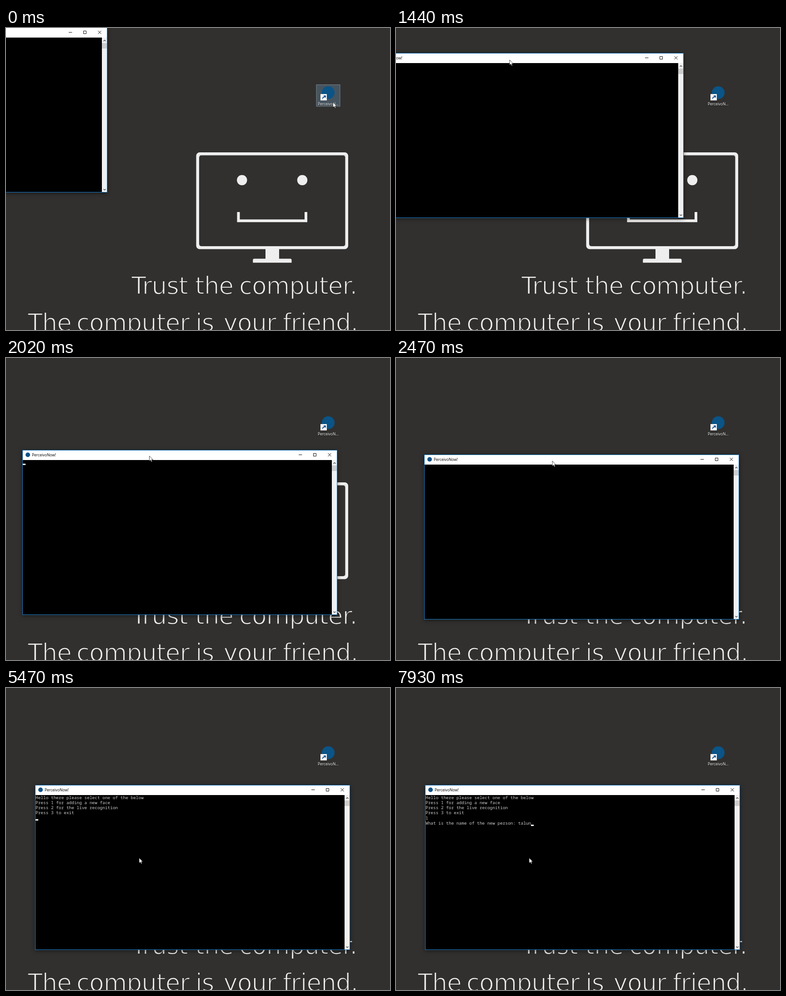
An HTML page for the animation above (8000 ms loop, 845x663 px).

```html
<!DOCTYPE html>
<html lang="en">
<head>
<meta charset="utf-8">
<title>Desktop console</title>
<style>
  html, body { margin: 0; width: 100%; height: 100%; overflow: hidden; background: #31302f; }
  svg { display: block; width: 100vw; height: 100vh; }
  text { white-space: pre; }
  /* The outline in the wall colour thins the letters. */
  .slogan { font: 400 53px "DejaVu Sans", sans-serif; letter-spacing: -.9px; fill: #f1f0ef; stroke: #31302f; stroke-width: 1.9px; }
  .ui { font: 8.4px "Open Sans", "Noto Sans", sans-serif; }
  .label { fill: #fff; text-anchor: middle; text-shadow: 0 1px 1px #000; }
  .console { font: 9.444px "Noto Sans Mono", "DejaVu Sans Mono", monospace; fill: #ccc; }
  #win { filter: drop-shadow(0 2px 5px rgba(0, 0, 0, .5)); }
</style>
</head>
<body>
<svg viewBox="0 0 845 663">
  <rect width="845" height="663" fill="#31302f"/>

  <g fill="#efeeee">
    <rect x="421.75" y="276.25" width="328" height="206" rx="4.5" fill="none" stroke="#efeeee" stroke-width="6.5"/>
    <path d="M425 285V279.5H430.5Q425 279.5 425 285ZM746.5 285V279.5H741Q746.5 279.5 746.5 285ZM425 473.5V479H430.5Q425 479 425 473.5ZM746.5 473.5V479H741Q746.5 479 746.5 473.5Z"/>
    <circle cx="519.3" cy="334" r="11.2"/>
    <circle cx="652" cy="334" r="11.2"/>
    <path d="M511.5 404V423.3H660V404" fill="none" stroke="#efeeee" stroke-width="6"/>
    <path d="M571 485H601V506.5H625.5Q628.5 506.5 628.5 509.5V515.3H543.3V509.5Q543.3 506.5 546.3 506.5H571Z"/>
  </g>
  <g class="slogan">
    <text y="584"><tspan x="276">Trust</tspan><tspan x="416">the</tspan><tspan x="513">computer.</tspan></text>
    <text y="665"><tspan x="48">The</tspan><tspan x="155">computer</tspan><tspan x="417">is</tspan><tspan x="478.5">your</tspan><tspan x="609">friend.</tspan></text>
  </g>

  <rect id="selection" x="683" y="124.5" width="52" height="47.5" fill="#46545f" stroke="#77838b"/>
  <circle cx="709" cy="142" r="14" fill="#0a5487"/>
  <rect x="692" y="145" width="14" height="14" fill="#f4f6f8"/>
  <path d="M696 157Q695 151 700 150.5L698.5 148H704V153.5L702 152Q698 152.500 696 157Z" fill="#2c5a94"/>
  <text class="ui label" x="709" y="169.500">PerceivoN...</text>

  <g id="win">
    <rect width="693" height="362" fill="#1a7fd0"/>
    <rect x="1" y="1" width="691" height="21" fill="#fff"/>
    <rect x="1" y="22" width="680" height="339" fill="#000"/>
    <rect x="681" y="22" width="11" height="339" fill="#f0f0f0"/>
    <rect x="681" y="34" width="11" height="12" fill="#cdcdcd"/>
    <path d="M684.500 30L687 27.500L689.500 30M684.500 354.500L687 357L689.500 354.500" fill="none" stroke="#444" stroke-width="1.2"/>
    <circle cx="12" cy="10.500" r="5" fill="#0f5288"/>
    <text class="ui" x="21" y="13.700" fill="#000">PerceivoNow!</text>
    <path d="M608 10.500H615.500M640.500 7.500H646.500V13.500H640.500ZM672.500 7L679.500 14M679.500 7L672.500 14" fill="none" stroke="#111"/>
    <g class="console" id="lines"></g>
    <rect id="caret" width="6" height="3" fill="#fff"/>
  </g>

  <path id="pointer" d="M0 0V11.500L2.700 9L4.500 13L6.300 12.200L4.600 8.300H8Z" fill="#fff" stroke="#000" stroke-width=".7"/>
</svg>
<script>
const LOOP = 8000, CHAR = 5.667, ROW = 11.333;
const $ = id => document.getElementById(id);

// Every track is a list of [start time, ...values] that hold until the next entry.
const windowTrack = [
  [0, -470, -1], [1280, -320, 6], [1440, -60, 55], [1580, 94, 102], [1710, 54, 131],
  [1860, 36, 175], [2020, 36, 202], [2170, 41, 206], [2320, 48, 208], [2470, 62, 212], [2600, 64, 213]
];
const pointerTrack = [
  [0, 719.5, 163], [130, 610, 120], [290, 469, 67], [1280, 89.5, 24], [1440, 250, 70],
  [1580, 365, 125], [1710, 318.5, 159], [1860, 314, 194], [2020, 315.5, 215], [2170, 321, 219],
  [2320, 329, 221], [2470, 344, 226], [2600, 345, 227], [3460, 346, 226.5],
  [4730, 332, 285], [4870, 305, 348], [5000, 293, 373]
];
// Caret: visible, row, column
const caretTrack = [
  [0, 1, 0, 0], [2470, 0, 0, 0], [3340, 1, 0, 0], [3890, 0, 4, 0], [4420, 1, 4, 0],
  [5000, 0, 4, 0], [5470, 1, 4, 0], [5780, 1, 4, 1], [5930, 0, 4, 1], [6210, 1, 5, 36], [7070, 0, 5, 36]
];
const keyTimes = [7350, 7500, 7640, 7780, 7930];
const typed = "talun";
const prompt = "What is the name of the new person: ";
const script = [
  [3890, "Hello there please select one of the below"],
  [3890, "Press 1 for adding a new face"],
  [3890, "Press 2 for the live recognition"],
  [3890, "Press 3 to exit"],
  [5780, "1"],
  [6210, prompt]
];

const lines = script.map((_, row) => {
  const line = document.createElementNS("http://www.w3.org/2000/svg", "text");
  line.setAttribute("x", 1);
  line.setAttribute("y", 30.5 + row * ROW);
  return $("lines").appendChild(line);
});

function at(track, t) {
  let now = track[0];
  for (const step of track) if (step[0] <= t) now = step;
  return now.slice(1);
}

function place(id, x, y) {
  $(id).setAttribute("transform", `translate(${x} ${y})`);
}

function show(id, on) {
  $(id).setAttribute("visibility", on ? "visible" : "hidden");
}

function draw(t) {
  const keys = keyTimes.filter(k => k <= t).length;
  place("win", ...at(windowTrack, t));
  place("pointer", ...at(pointerTrack, t));
  show("selection", t < 130);

  script.forEach(([start, text], row) => {
    const full = text === prompt ? text + typed.slice(0, keys) : text;
    lines[row].textContent = t >= start ? full : "";
  });

  const [on, row, col] = at(caretTrack, t);
  show("caret", on || keys);
  place("caret", Math.round(1 + (col + keys) * CHAR), Math.round(30 + row * ROW));
}

function tick(now) {
  draw(now % LOOP);
  requestAnimationFrame(tick);
}
draw(0);
requestAnimationFrame(tick);
</script>
</body>
</html>
```
